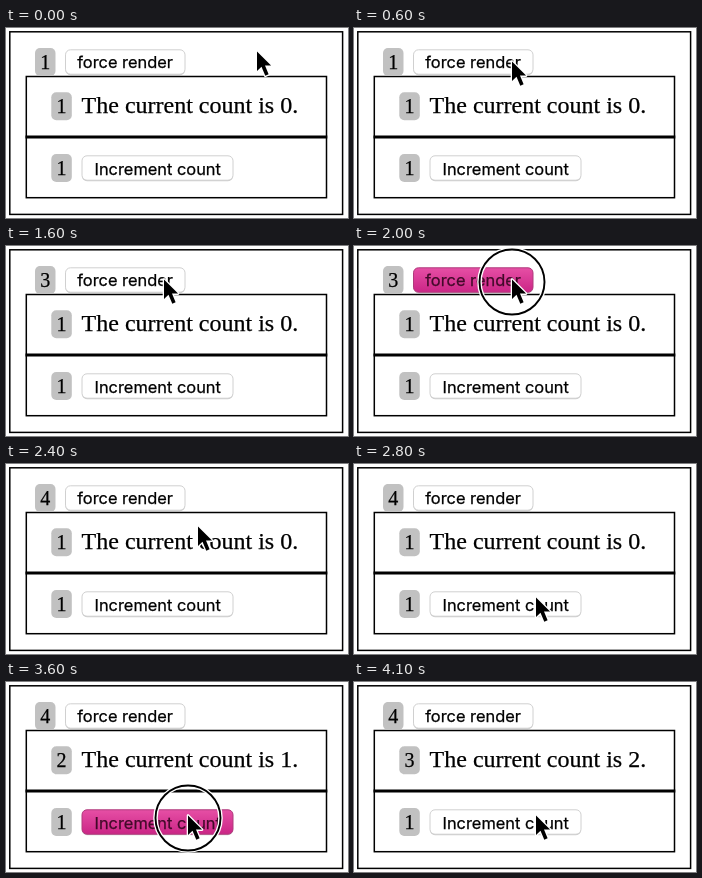
These frames come from a looping animation (342x190 px, 4200 ms). An HTML page:

```html
<!DOCTYPE html>
<html lang="en">
<head>
<meta charset="utf-8">
<title>Render counts</title>
<style>
html, body { margin: 0; width: 100%; height: 100%; overflow: hidden; background: #fff; }
svg { display: block; width: 100vw; height: 100vh; }
text { stroke: currentColor; stroke-width: .25; }
.frame { fill: none; stroke: #000; stroke-width: 1.5; }
.badge rect { fill: #c1c1c1; }
.badge text { font: 20px "Liberation Serif", Times, serif; text-anchor: middle; }
.line { font: 24px "Liberation Serif", Times, serif; }
.button rect { fill: #fff; stroke: #d0d0d0; }
.button text { font: 16.4px Inter, sans-serif; fill: #000; text-anchor: middle; }
.button .shade { fill: #000; stroke: none; opacity: .2; }
.button.down .face { fill: url(#pink); stroke: #b03a7c; }
.button.down text { fill: #420a29; color: #420a29; }
#ring circle { fill: none; }
</style>
</head>
<body>
<svg viewBox="0 0 342 190">
  <defs>
    <linearGradient id="pink" x2="0" y2="1">
      <stop stop-color="#e64fa5"/>
      <stop offset="1" stop-color="#cb2586"/>
    </linearGradient>
  </defs>
  <rect class="frame" x="3.8" y="3.8" width="332.8" height="182.6"/>
  <rect class="frame" x="20.3" y="48.5" width="300.2" height="121.2"/>
  <path d="M19.5 109H321.3" stroke="#000" stroke-width="3"/>
  <g class="badge" transform="translate(29 20)">
    <rect width="20.5" height="28" rx="5"/><text id="outer" x="10.2" y="21">1</text>
  </g>
  <g class="badge" transform="translate(45.3 64.3)">
    <rect width="20.5" height="28" rx="5"/><text id="inner" x="10.2" y="21">1</text>
  </g>
  <g class="badge" transform="translate(45.3 126)">
    <rect width="20.5" height="28" rx="5"/><text x="10.2" y="21">1</text>
  </g>
  <text id="label" class="line" x="75.6" y="85.4"></text>
  <g id="force" class="button">
    <rect class="shade" x="59.5" y="23" width="119.5" height="24.3" rx="5"/>
    <rect class="face" x="59.5" y="21.8" width="119.5" height="24.4" rx="5"/>
    <text x="119.1" y="40.2">force render</text>
  </g>
  <g id="add" class="button">
    <rect class="shade" x="76" y="129" width="151" height="24.3" rx="5"/>
    <rect class="face" x="76" y="127.8" width="151" height="24.4" rx="5"/>
    <text x="151.7" y="146.6">Increment count</text>
  </g>
  <g id="pointer">
    <g id="ring">
      <circle cy="3" r="32.5" stroke="#fff" stroke-width="4.6"/>
      <circle cy="3" r="32.5" stroke="#000" stroke-width="1.9"/>
    </g>
    <path d="M0 .5V20L4.5 15.8L8.3 24.8L11.6 23.3L8 14.6H14.1Z"
      stroke="#fff" stroke-width="2.6" stroke-linejoin="round" paint-order="stroke"/>
  </g>
</svg>
<script>
const LOOP = 4200, STEP = 100;
const $ = id => document.getElementById(id);

// time, x, y
const path = [
  [0, 251, 23], [600, 158, 33], [2200, 158, 33],
  [2400, 192, 62], [2800, 182, 133], [LOOP, 182, 133]
];
// press and release times
const forceClicks = [[800, 1000], [1400, 1600], [1900, 2200]];
const addClicks = [[3000, 3200], [3500, 3700]];

const ease = u => u * u * (3 - 2 * u);
const isDown = (clicks, t) => clicks.some(([a, b]) => t >= a && t < b);
const countDone = (clicks, t) => clicks.filter(c => t >= c[1]).length;

function pointerAt(t) {
  const i = path.findIndex(p => p[0] > t);
  const [t0, x0, y0] = path[i - 1], [t1, x1, y1] = path[i];
  const u = ease((t - t0) / (t1 - t0));
  return [x0 + (x1 - x0) * u, y0 + (y1 - y0) * u];
}

function draw(time) {
  const t = Math.floor(time % LOOP / STEP) * STEP;
  const force = isDown(forceClicks, t), add = isDown(addClicks, t);
  const count = countDone(addClicks, t);
  $("force").classList.toggle("down", force);
  $("add").classList.toggle("down", add);
  $("ring").style.display = force || add ? "" : "none";
  $("outer").textContent = 1 + countDone(forceClicks, t);
  $("inner").textContent = 1 + count;
  $("label").textContent = `The current count is ${count}.`;
  $("pointer").setAttribute("transform", `translate(${pointerAt(t)})`);
}

const start = performance.now();
function tick() {
  draw(performance.now() - start);
  requestAnimationFrame(tick);
}
tick();
</script>
</body>
</html>
```
